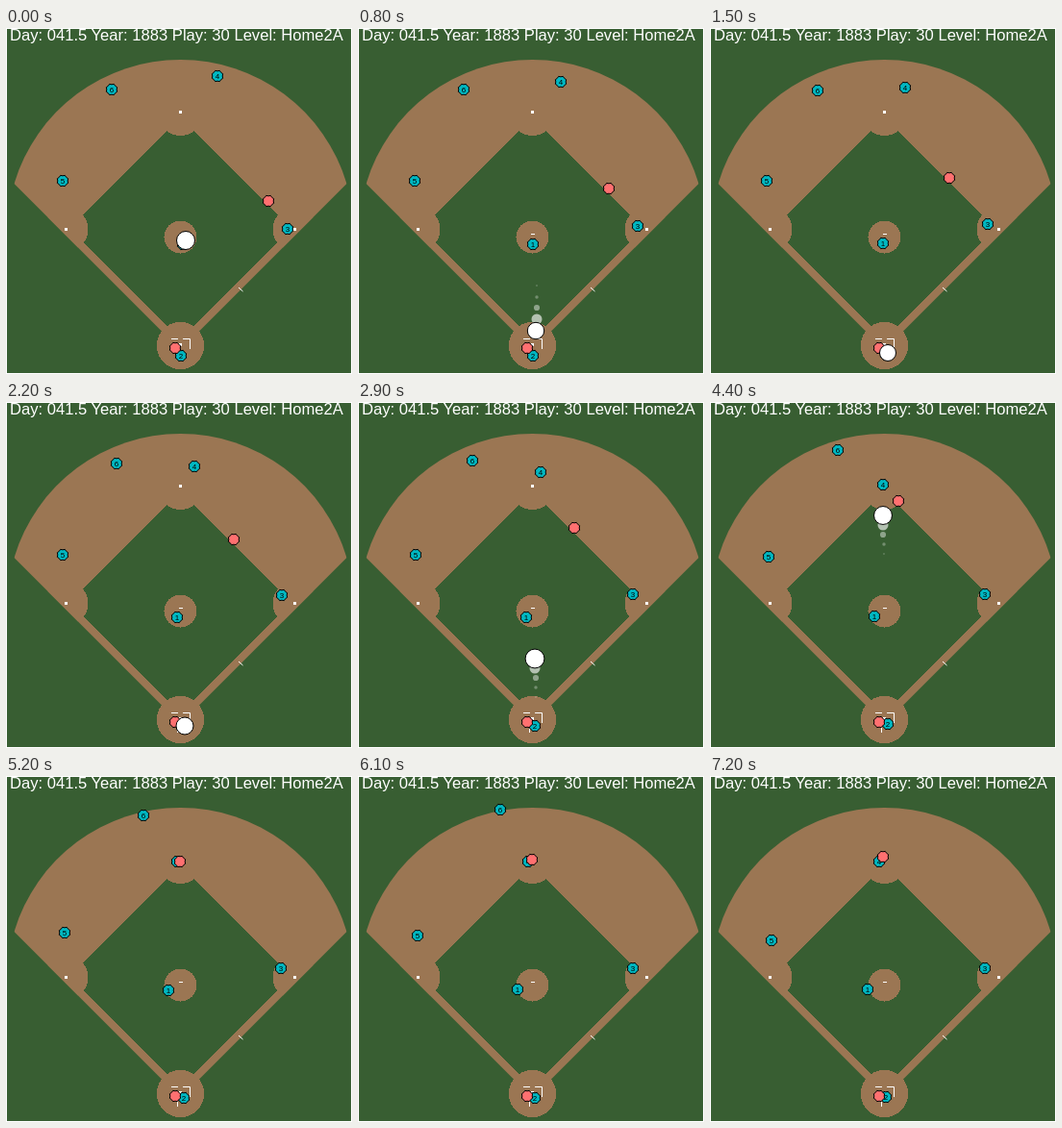
Write an HTML page with a canvas that moves like this. It is 360 px wide and 360 px high and loops after 7.3 s.

```html
<!DOCTYPE html>
<html lang="en">
<head>
<meta charset="utf-8">
<title>Baseball play</title>
<style>
  html, body { margin: 0; width: 100%; height: 100%; overflow: hidden; background: #385e32; }
  svg, canvas { position: absolute; left: 0; top: 0; width: 360px; height: 360px; }
  text { font: 16.6px "Liberation Sans", Arial, sans-serif; fill: #fff; }
</style>
</head>
<body>
<svg viewBox="0 0 360 360">
  <clipPath id="fair"><path d="M182 335 L9 162 A180.5 180.5 0 0 1 355 162 Z"/></clipPath>
  <rect width="360" height="360" fill="#385e32"/>
  <g transform="translate(-.5)" fill="#9b7653" shape-rendering="crispEdges">
    <g clip-path="url(#fair)">
      <rect width="360" height="360"/>
      <path d="M182 93 L297.5 208.5 L182 324 L66.5 208.5 Z" fill="#385e32"/>
      <circle cx="63" cy="209.5" r="23"/>
      <circle cx="301" cy="209.5" r="23"/>
      <circle cx="182" cy="88" r="24"/>
    </g>
    <circle cx="182" cy="217.5" r="17"/>
    <circle cx="182" cy="330.5" r="24.7"/>
  </g>
  <g fill="#fff" shape-rendering="crispEdges">
    <circle cx="62.5" cy="209.5" r="1.5"/>
    <circle cx="300.5" cy="209.5" r="1.5"/>
    <circle cx="181.5" cy="87.5" r="1.5"/>
    <circle cx="181.5" cy="329.5" r="1.5"/>
    <rect x="180" y="214" width="4" height="1"/>
  </g>
  <path d="M172 323.5 H179 M184 323.5 H191.5 V334 M178.5 334 V344 M242 270 L246.5 274" fill="none" stroke="#fff"/>
  <rect x=".5" y=".5" width="359" height="359" fill="none" stroke="#fff"/>
  <text x="4" y="13">Day: 041.5 Year: 1883 Play: 30 Level: Home2A</text>
</svg>
<canvas id="play" width="360" height="360"></canvas>
<script>
const ctx = document.getElementById('play').getContext('2d');
const LOOP = 7300, STEP = 100;  // all other times are counted in steps
const TEAL = '#00b8c2', RED = '#ff7070';

// One stretch of a run; the bend point gives it constant acceleration
const leg = (start, end, from, to, bend = from.map((v, i) => (v + to[i]) / 2)) =>
  ({ start, end, from, to, bend });

const progress = ({ start, end }, t) => Math.min(1, Math.max(0, (t - start) / (end - start)));

const currentLeg = (legs, t) => legs.findLast(l => l.start <= t) ?? legs[0];

function position(legs, t) {
  const l = currentLeg(legs, t), u = progress(l, t), v = 1 - u;
  return l.from.map((p, i) => Math.round(v * v * p + 2 * u * v * l.bend[i] + u * u * l.to[i]));
}

const players = [
  { label: '1', legs: [leg(0, 68, [184, 225], [164, 222])] },
  { label: '2', legs: [leg(8, 37, [182, 341], [185, 335]), leg(56, 70, [185, 335], [183, 334])] },
  { label: '3', legs: [leg(0, 26, [293, 209], [286, 200])] },
  { label: '4', legs: [leg(0, 48, [220, 50], [178, 89], [190, 68]), leg(52, 70, [178, 89], [176, 89])] },
  { label: '5', legs: [leg(9, 72, [59, 159], [64, 171], [59, 156])] },
  { label: '6', legs: [leg(9, 56, [110, 64], [148, 35], [115, 69])], until: 68 },
  { color: RED, legs: [leg(0, 51, [273, 180], [181, 89], [235, 140]), leg(54, 70, [181, 89], [180, 84])] },
  { color: RED, legs: [leg(0, 48, [176, 333], [176, 333])] }
];

const pitch = leg(0, 10, [187, 221], [185, 338]);
const toSecond = leg(22, 47, [186, 337], [179, 88]);
const ball = { legs: [pitch, toSecond], until: 51 };

function ballRadius(t) {
  const l = currentLeg(ball.legs, t), u = progress(l, t);
  return l === pitch ? 10 - u : 9.5 + 1.2 * Math.sin(Math.PI * u);
}

function disc(x, y, r, fill) {
  ctx.beginPath();
  ctx.arc(x, y, r, 0, 2 * Math.PI);
  ctx.fillStyle = fill;
  ctx.fill();
}

function drawPlayer({ legs, label, color = TEAL }, t) {
  const [x, y] = position(legs, t);
  ctx.beginPath();
  for (let i = 0; i < 16; i++) {
    const a = i * Math.PI / 8, r = i % 2 ? 6.1 : 5.2;
    ctx.lineTo(x + r * Math.cos(a), y + r * Math.sin(a));
  }
  ctx.closePath();
  ctx.fillStyle = color;
  ctx.fill();
  ctx.stroke();
  if (label) {
    ctx.fillStyle = '#000';
    ctx.fillText(label, x, y + 3);
  }
}

function drawBall(t) {
  for (let i = Math.min(4, t); i > 0; i--) {
    const fade = 0.7 ** (i - 1);
    disc(...position(ball.legs, t - i), 5.5 * 0.56 ** (i - 1), `rgba(255,255,255,${0.62 * fade})`);
  }
  disc(...position(ball.legs, t), ballRadius(t) - 0.5, '#fff');
  ctx.stroke();
}

function draw(now) {
  const t = Math.floor((now % LOOP) / STEP);
  ctx.clearRect(0, 0, 360, 360);
  for (const p of players) if (t < (p.until ?? Infinity)) drawPlayer(p, t);
  if (t < ball.until) drawBall(t);
}

ctx.strokeStyle = '#000';
ctx.font = '8px "Liberation Sans", Arial, sans-serif';
ctx.textAlign = 'center';

const start = performance.now();
function tick() {
  draw(performance.now() - start);
  requestAnimationFrame(tick);
}
tick();
</script>
</body>
</html>
```
